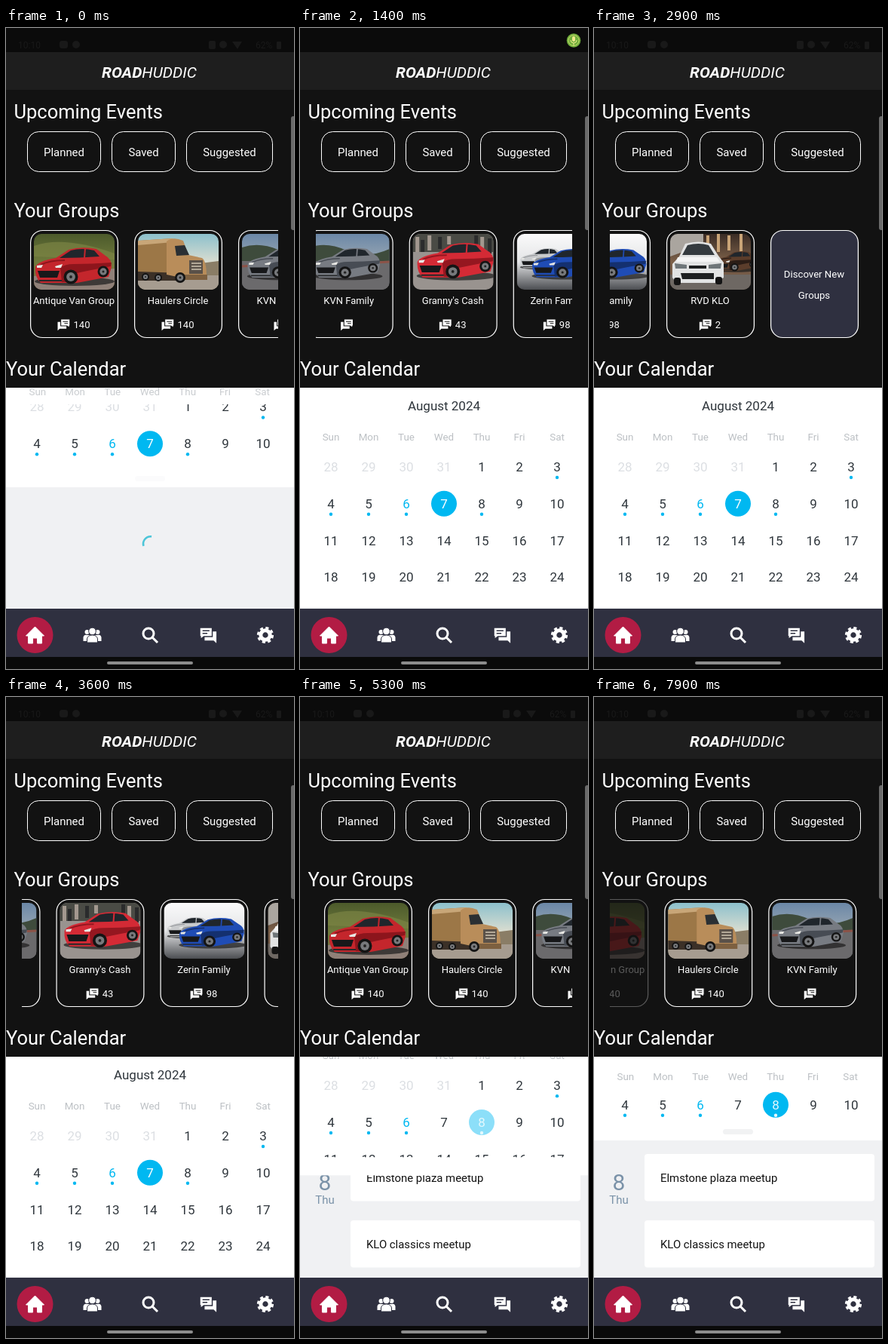
Animation of 382x850 px, one loop 8000 ms. Source, as an HTML page:

```html
<!DOCTYPE html>
<html lang="en">
<head>
<meta charset="utf-8">
<style>
html, body { margin: 0; width: 100%; height: 100%; overflow: hidden; background: #121212; }
svg { display: block; width: 100%; height: 100%; font-family: Roboto, sans-serif; }
</style>
</head>
<body>
<svg id="stage" viewBox="0 0 382 850"></svg>
<script>
const BLUE = '#00b8f1', INK = '#2f363c', PALE = '#dcdfe3', NAV = '#2f3040', DIM = '#191919', OPEN = 180;
const days = ['Sun', 'Mon', 'Tue', 'Wed', 'Thu', 'Fri', 'Sat'];

const text = (x, y, size, str, fill = '#fff', anchor = 'start', more = '') =>
  `<text x="${x}" y="${y}" font-size="${size}" fill="${fill}" text-anchor="${anchor}" ${more}>${str}</text>`;
const rect = (x, y, w, h, fill, r = 0, more = '') =>
  `<rect x="${x}" y="${y}" width="${w}" height="${h}" rx="${r}" fill="${fill}" ${more}/>`;
const path = (d, fill, more = '') => `<path d="${d}" fill="${fill}" ${more}/>`;
const line = (d, stroke, width) => path(d, 'none', `stroke="${stroke}" stroke-width="${width}"`);
const dot = (x, y, r, fill, more = '') => `<circle cx="${x}" cy="${y}" r="${r}" fill="${fill}" ${more}/>`;
const group = (x, y, inner, more = '') => `<g transform="translate(${x} ${y})" ${more}>${inner}</g>`;
const clip = (id, shape) => `<clipPath id="${id}">${shape}</clipPath>`;
const blend = (id, ...colors) => `<linearGradient id="${id}" x2="0" y2="1">` +
  colors.map((c, i) => `<stop offset="${i / (colors.length - 1)}" stop-color="${c}"/>`).join('') + '</linearGradient>';

const chat = (x, y, sx, sy, back) => `<g transform="translate(${x} ${y}) scale(${sx} ${sy})">` +
  path('M7 6H24V24L20 20H7z', '#fff') +
  path('M0 0H18V14H6L1 18V14H0z', '#fff', `stroke="${back}" stroke-width="1.6"`) +
  line('M4 5H14M4 9H11', back, 1.6) + '</g>';

// ---- card pictures, 107 x 74 ----
const wheel = (x, y, r) => dot(x, y, r, '#141414') + dot(x, y, r * .62, '#77797c') + dot(x, y, r * .2, '#222');
const car = (color, shade, move) => `<g transform="${move}">` +
  '<ellipse cx="55" cy="61" rx="53" ry="6" fill="#1c1c1c" opacity=".7"/>' +
  path('M3 42Q6 34 30 30L47 19Q64 14 84 18L96 27Q104 31 104 42L100 55L58 63H10Q2 56 3 42z', color) +
  path('M35 30L50 20Q65 16 81 20L88 28Q62 30 35 30z', '#20262c') + line('M69 17L68 30', color, 2) +
  path('M36 43Q42 38 54 38Q78 38 104 36L103 41Q76 46 58 50L52 62H38z', shade) +
  line('M10 39Q22 33 42 33', shade, 2) +
  path('M6 47H35L32 56H9z', '#17181a') + path('M5 40L13 39L11 43H5zM29 41L39 38L37 43H30z', '#e8e8e4') +
  line('M8 60H38', '#27282a', 2) + wheel(50, 55, 9.5) + wheel(93, 48, 7.5) + '</g>';
const front = path('M3 40L12 30L20 13Q38 8 54 13L64 29L71 38V58L60 65H8L3 58z', '#e2e3e3') +
  path('M16 28L23 15Q38 11 51 15L59 28z', '#343a3e') + path('M10 31H62L66 37H8z', '#f4f4f4') +
  path('M6 39L22 41V46H7zM68 39L51 41V46H67z', '#6f7679') + path('M25 42H48V46H25zM14 52H58V60H16z', '#1d1f20') +
  rect(5, 58, 9, 10, '#141414', 3) + rect(60, 57, 9, 10, '#141414', 3);
const scenes = [
  rect(0, 0, 107, 74, 'url(#field)') + path('M0 16Q40 2 107 26V34L0 30z', '#7b8443', 'opacity=".7"') +
    path('M0 56L107 46V74H0z', '#8f8078') + car('#c4262c', '#8d151c', 'translate(-1 2)'),
  rect(0, 0, 107, 74, 'url(#sky)') + path('M60 42L107 36V60H60z', '#8a7d66') + rect(0, 55, 107, 19, '#a69c90') +
    path('M0 9L46 6V54H0z', '#9c7747') + path('M0 9L46 6V11L0 15z', '#c8a678') +
    path('M0 50L60 52V62H0z', '#3b3027') +
    path('M38 54V10Q46 3 60 9L67 28L85 32Q91 36 91 57H52z', '#b98d5a') +
    path('M49 16L62 15L68 28L51 29z', '#2a2f33') + path('M68 35H86V53H68z', '#5a5149') +
    line('M71 39H84M71 43H84M71 47H84', '#cfc5b3', 1.5) +
    path('M62 54H92V61H62z', '#7d6040') + wheel(56, 58, 7) + wheel(27, 58, 5) + wheel(10, 57, 5),
  rect(0, 0, 107, 74, 'url(#dusk)') + path('M0 18Q24 10 50 22T107 20V40H0z', '#3e4b3c') +
    rect(0, 36, 107, 38, '#6b6a6c') + line('M0 43L107 37', '#8c5348', 3) +
    car('#777b82', '#474c54', 'translate(5 5) scale(.86 .84)'),
  rect(0, 0, 107, 74, '#99938f') + rect(0, 0, 107, 24, '#4a4b45') +
    line('M6 4V24M22 2V22M48 3V14M92 4V26', '#a3988f', 5) + line('M13 8V24M36 4V20M84 2V22M102 6V26', '#2a2b2c', 5) +
    car('#d42a35', '#951720', 'translate(3 -4) scale(1 .98)'),
  rect(0, 0, 107, 74, 'url(#studio)') + car('#c9cbcd', '#8f9296', 'translate(3 10) scale(.58 .56)') +
    car('#1f4cb5', '#14306f', 'translate(18 7) scale(.85 .8)'),
  rect(0, 0, 107, 74, 'url(#street)') + path('M0 0H44V14L0 30z', '#aaa59f') +
    line('M50 2V22M64 0V24M78 2V22M94 0V26', '#c9a477', 4) + rect(0, 54, 107, 20, '#6e6863') +
    car('#5b3d2b', '#2b1d16', 'translate(58 14) scale(.55)') + front
];

const groups = [['Antique Van Group', '140'], ['Haulers Circle', '140'], ['KVN Family', ''],
  ["Granny's Cash", '43'], ['Zerin Family', '98'], ['RVD KLO', '2']];
const frame = fill => rect(.6, 268.5, 115.8, 142, fill, 16, 'stroke="#fff" stroke-width="1.2"');
const card = ([name, count], i) => {
  const left = 58 - (21 + count.length * 7.3) / 2;
  return group(32 + 138 * i, 0, frame('#121212') +
    group(5, 273, scenes[i], 'clip-path="url(#photo)"') +
    text(58, 366, 13, name, '#fff', 'middle') +
    chat(left + 16.3, 386, -.68, .64, '#121212') + text(left + 21, 398, 13, count),
    i ? '' : 'id="first"');
};
const discover = group(860, 0, frame(NAV) + text(58, 331, 13.2, 'Discover New', '#fff', 'middle') +
  text(58, 359, 13.2, 'Groups', '#fff', 'middle'));

// ---- calendar, laid out fully open ----
const dates = () => {
  let out = '';
  for (let i = 0; i < 28; i++) {
    const n = i < 4 ? 28 + i : i - 3, x = 41 + 50 * (i % 7), y = 582 + 48.8 * (i / 7 | 0);
    const live = i >= 4, chosen = live && (n === 7 || n === 8);
    if (chosen) out += dot(x, y, 17, BLUE, `id="ring${n}"`);
    out += text(x, y + 6, 17, n, !live ? PALE : n === 6 ? BLUE : INK, 'middle', chosen ? `id="num${n}"` : '');
    if (live && [3, 4, 5, 6, 8].includes(n)) out += dot(x, y + 14, 2.2, BLUE, n === 8 ? 'id="mark"' : '');
  }
  return out;
};
const names = (y, step) => days.map((d, i) => text(191 + step * (i - 3), y, 13.4, d, '#bcc0c4', 'middle')).join('');

const pill = (x, w, label) => rect(x + .5, 137.5, w, 53, '#121212', 15, 'stroke="#fff" stroke-width="1"') +
  text(x + w / 2 + .5, 170, 14.9, label, '#fff', 'middle');
const entry = (y, label) => rect(67, y, 305, 62.5, '#fff', 4) + text(88, y + 37, 14.9, label, '#111');

const people = dot(-7, -4, 3, '#fff') + dot(7, -4, 3, '#fff') +
  path('M-12 8V3Q-11-1-7 0H7Q11-1 12 3V8z', '#fff') +
  dot(0, -5, 4.8, '#fff', `stroke="${NAV}"`) +
  path('M-7 10V5Q-6 0 0 0T7 5V10z', '#fff', `stroke="${NAV}"`);
const lens = '<g fill="none" stroke="#fff" stroke-width="3"><circle cx="-2" cy="-2" r="7"/><path d="M3 3L10 10"/></g>';
const gear = '<g fill="none" stroke="#fff"><circle r="6.2" stroke-width="5"/>' +
  '<circle r="9.3" stroke-width="3.6" stroke-dasharray="4 3.304"/></g>';

stage.innerHTML = '<defs>' +
  clip('strip', rect(21, 260, 340, 160)) + clip('photo', rect(0, 0, 107, 74, '#000', 10)) +
  clip('sheet', '<rect id="sheetBox" y="477" width="382" height="111"/>') +
  blend('field', '#4c5a2b', '#6f7a3c', '#7b6a42') + blend('sky', '#8cc0cc', '#d8dcd0', '#d5c6a4') +
  blend('dusk', '#6b87a6', '#9aa8b4', '#777') + blend('studio', '#fafafa', '#e4e5e7', '#4c4e52') +
  blend('street', '#3a2c25', '#7d614a', '#6b5444') + '</defs>' +
  rect(0, 0, 382, 850, '#121212') + rect(0, 0, 382, 32, '#0b0b0b') + rect(0, 32, 382, 50, '#1e1e1e') +
  '<g id="status">' + text(16, 27, 12, '10:10', DIM) + rect(71, 17, 11, 10, DIM, 3) + dot(93, 22, 5, DIM) +
    rect(269, 17, 9, 11, DIM, 2) + dot(288, 22, 5, DIM) + path('M300 18H313L307 28z', DIM) +
    text(331, 27, 12, '62%', DIM) + rect(359, 18, 6, 10, DIM, 1) + '</g>' +
  '<g id="mic">' + dot(363, 16.5, 9.3, '#6fae3c') + dot(363, 16.5, 7, 'none', 'stroke="#c7d86a"') +
    rect(361, 11, 4, 7, '#f1e98c', 2) + line('M359 16Q359 20 363 20T367 16M363 20V23', '#f1e98c', 1) + '</g>' +
  text(127, 66, 20.8, '<tspan font-weight="700">ROAD</tspan>HUDDIC', '#fff', 'start', 'font-style="italic"') +
  text(10.5, 120, 25.5, 'Upcoming Events') + pill(28, 97, 'Planned') + pill(140, 84, 'Saved') + pill(239, 114, 'Suggested') +
  rect(378, 117, 8, 151, '#6a6a6a', 3) +
  text(10.5, 250.6, 25.5, 'Your Groups') +
  '<g clip-path="url(#strip)"><g id="cards">' + groups.map(card).join('') + discover + '</g></g>' +
  text(0, 460.6, 25.5, 'Your Calendar') +
  rect(0, 477, 382, 294, '#f0f1f3') +
  group(192, 684, path('M-9.5 3A9.7 9.7 0 0 1 1-9.6', 'none', 'id="spin" stroke="#4cc5d8" stroke-width="2.6"'), 'id="wait"') +
  '<g id="agenda">' + text(33, 654, 30, '8', '#7a92a8', 'middle') + text(33, 672, 15, 'Thu', '#7a92a8', 'middle') +
    entry(606, 'Elmstone plaza meetup') + entry(694, 'KLO classics meetup') + '</g>' +
  '<g clip-path="url(#sheet)">' + rect(0, 477, 382, 300, '#fff') +
    '<g id="month">' + text(191, 507, 17, 'August 2024', INK, 'middle') + names(547, 50) + dates() + '</g>' +
    '<g id="grip">' + rect(0, 564, 382, 24, '#fff') + rect(171, 573, 40, 7, '#f1f2f3', 3.5, 'id="knob"') + '</g>' +
    '<g id="week">' + rect(0, 477, 382, 43, '#fff') + '<g id="weekNames">' + names(508, 49.7) + '</g></g></g>' +
  rect(0, 770, 382, 64, NAV) + rect(0, 834, 382, 16, '#0a0a0a') + rect(134, 840, 114, 4, '#8c8c8c', 2) +
  dot(38.5, 805, 24, '#b21c44') +
  group(38.5, 805, path('M-12 1L0-11L12 1H9V11H3V4H-3V11H-9V1z', '#fff', 'stroke="#fff" stroke-linejoin="round"')) +
  group(114.5, 805, people) + group(191, 805, lens) + chat(257, 795, .92, .86, NAV) + group(344, 805, gear);

// ---- motion ----
const el = id => document.getElementById(id);
const set = (id, name, value) => el(id).setAttribute(name, value);
const shift = (id, x, y) => set(id, 'transform', `translate(${x} ${y})`);
const show = (id, on) => set(id, 'opacity', +on);
const clamp = v => Math.min(1, Math.max(0, v));

// Monotone cubic through [time, value] points
function track(t, keys) {
  const last = keys.length - 1;
  if (t <= keys[0][0]) return keys[0][1];
  if (t >= keys[last][0]) return keys[last][1];
  const i = keys.findIndex(k => k[0] > t) - 1;
  const slope = j => (keys[j + 1][1] - keys[j][1]) / (keys[j + 1][0] - keys[j][0]);
  const bend = j => {
    if (j < 1 || j >= last) return 0;
    const a = slope(j - 1), b = slope(j);
    return a * b > 0 ? 2 * a * b / (a + b) : 0;
  };
  const [t0, a] = keys[i], [t1, b] = keys[i + 1], d = t1 - t0, u = (t - t0) / d, v = 1 - u;
  return v * v * (1 + 2 * u) * a + u * u * (3 - 2 * u) * b + d * u * v * (v * bend(i) - u * bend(i + 1));
}
const swipes = [[450, 0], [1400, 301], [2200, 562], [2700, 626], [3000, 626], [3600, 380], [4250, -.7],
  [4400, -.7], [4550, 0], [7800, 0], [7900, 76], [8000, 150]];

function draw(t) {
  shift('cards', -track(t, swipes), 0);
  set('first', 'opacity', t > 7800 ? .3 : 1);

  const drop = t < 4000 ? 20 + (OPEN - 20) * (1 - (1 - clamp(t / 500)) ** 3)
    : track(t, [[4900, OPEN], [5500, 0]]);
  set('sheetBox', 'height', 111 + drop);
  shift('month', 0, (drop - OPEN) / 2);
  shift('grip', 0, drop);
  shift('week', 0, -drop);
  set('knob', 'opacity', 1 - clamp(drop / 30));
  set('weekNames', 'opacity', 1 - clamp(drop / 104));

  const picked = t >= 4700;
  show('ring7', !picked);
  set('num7', 'fill', picked ? INK : '#fff');
  set('ring8', 'opacity', picked ? .45 + .55 * clamp((t - 6700) / 700) : 0);
  set('num8', 'fill', picked ? '#e4f8fd' : INK);
  set('mark', 'fill', picked ? '#e4f8fd' : BLUE);
  show('agenda', picked);
  show('wait', !picked);
  set('spin', 'transform', `rotate(${t * .36})`);

  const recording = t >= 500 && t < 1800;
  show('mic', recording);
  show('status', !recording);
}

const start = performance.now();
(function tick() {
  draw((performance.now() - start) % 8000);
  requestAnimationFrame(tick);
})();
</script>
</body>
</html>
```
